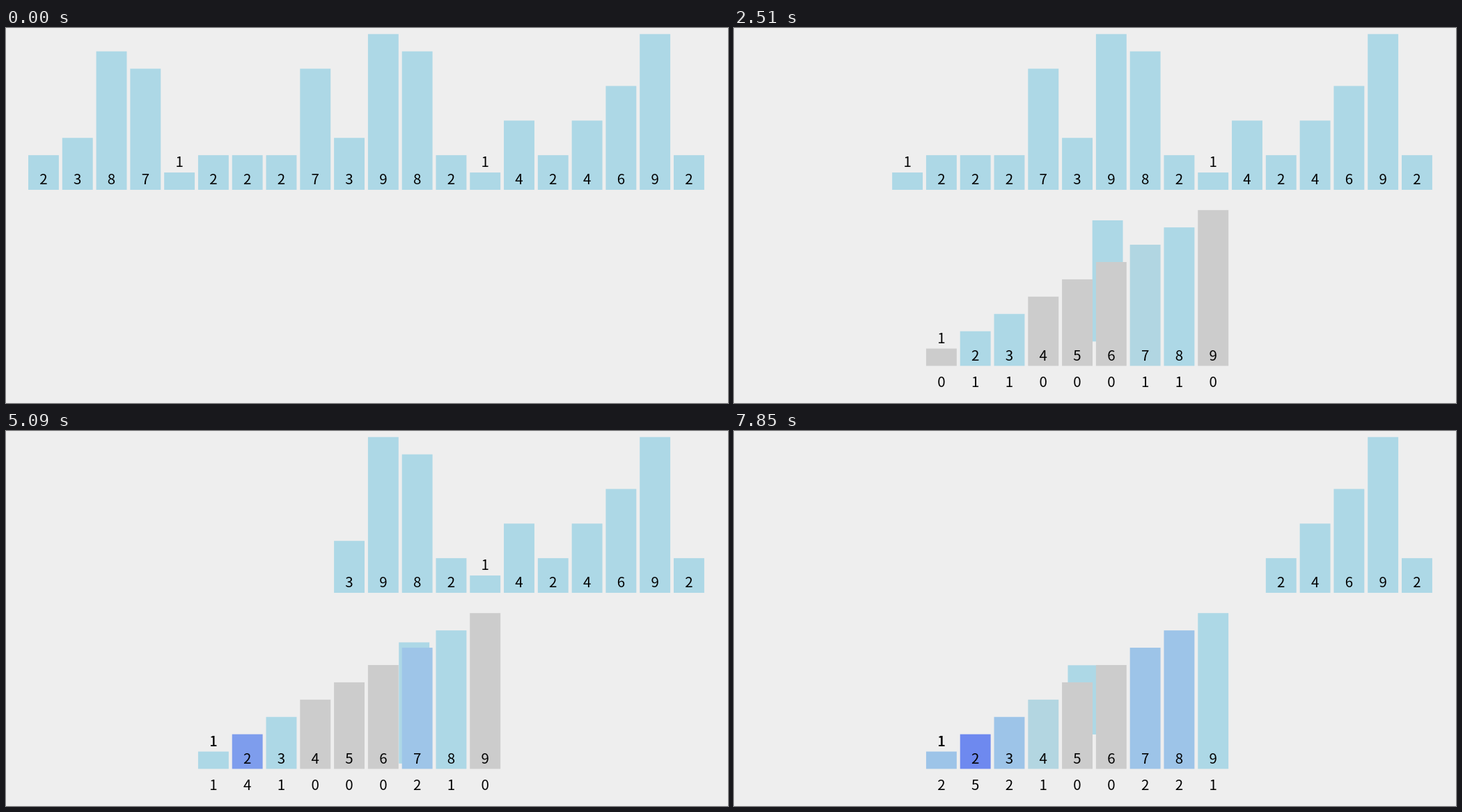
An HTML page with a canvas for the animation above (8 s loop, 1037x540 px).

```html
<!DOCTYPE html>
<html lang="en">
<head>
<meta charset="utf-8">
<title>Counting sort</title>
<style>
  html, body { margin: 0; width: 100%; height: 100%; overflow: hidden; background: #eee; }
  canvas { display: block; }
</style>
</head>
<body>
<canvas width="1037" height="540"></canvas>
<script>
const ctx = document.querySelector('canvas').getContext('2d');
const LOOP = 8000, FADE_START = 345, FIRST_MOVE = 855, MOVE_EVERY = 486.5, MOVE = 290;
const LEFT = 32, PITCH = 48.79, BAR = 43.9, UNIT = 24.92;
const TOP_ROW = 233, BOTTOM_ROW = 486.5;
const GRAY = [204, 204, 204], LIGHT = [173, 216, 230], BLUE = [0, 0, 255];
const values = [...'23871222739821424692'].map(Number);

// The picture refreshes in even steps of about REFRESH ms between these moments
const REFRESH = 136;
const beats = [0, 500, 1710, 2910, 3570, 4560, 5820, 6780, 7850, LOOP];

const slotX = i => LEFT + PITCH * i;
const mix = (a, b, k) => a + (b - a) * k;
const mixColor = (a, b, k) => a.map((v, i) => mix(v, b[i], k));
const rgb = c => `rgb(${c.map(Math.round)})`;
const countColor = n => n ? mixColor(LIGHT, BLUE, (n - 1) / 11) : GRAY;

function refreshTime(time) {
  const next = beats.findIndex(beat => beat > time);
  const from = beats[next - 1], span = beats[next] - from;
  const step = span / Math.round(span / REFRESH);
  return from + Math.floor((time - from) / step) * step;
}

// Cubic ease in and out
function progress(time, start) {
  const t = Math.min(1, Math.max(0, (time - start) / MOVE));
  return t < 0.5 ? 4 * t ** 3 : 1 - 4 * (1 - t) ** 3;
}

function text(value, x, baseline) {
  ctx.fillStyle = '#000';
  ctx.fillText(value, x + BAR / 2, baseline);
}

const label = (value, x, bottom) => text(value, x, bottom - (value > 1 ? 8 : 33));

function bar(value, x, bottom, color) {
  ctx.fillStyle = rgb(color);
  ctx.fillRect(x, bottom - value * UNIT, BAR, value * UNIT);
  label(value, x, bottom);
}

function draw(time) {
  ctx.globalAlpha = 1;
  ctx.fillStyle = '#eee';
  ctx.fillRect(0, 0, 1037, 540);
  ctx.font = '20.5px "Noto Sans CJK SC", "Noto Sans CJK JP", "Noto Sans", sans-serif';
  ctx.textAlign = 'center';

  const counts = Array(10).fill(0);
  const colors = Array(10).fill(GRAY);
  values.forEach((value, i) => {
    const p = progress(time, FIRST_MOVE + i * MOVE_EVERY);
    const target = slotX(value + 4);
    if (p > 0) {
      const n = ++counts[value];
      colors[value] = mixColor(countColor(n - 1), countColor(n), p);
    }
    // A landed bar is covered, only its label can still show
    if (p < 1) bar(value, mix(slotX(i), target, p), mix(TOP_ROW, BOTTOM_ROW, p), LIGHT);
    else label(value, target, BOTTOM_ROW);
  });

  ctx.globalAlpha = progress(time, FADE_START);
  for (let value = 1; value <= 9; value++) {
    const x = slotX(value + 4);
    bar(value, x, BOTTOM_ROW, colors[value]);
    text(counts[value], x, 517);
  }
}

const begin = performance.now();
function frame() {
  draw(refreshTime((performance.now() - begin) % LOOP));
  requestAnimationFrame(frame);
}
frame();
</script>
</body>
</html>
```
